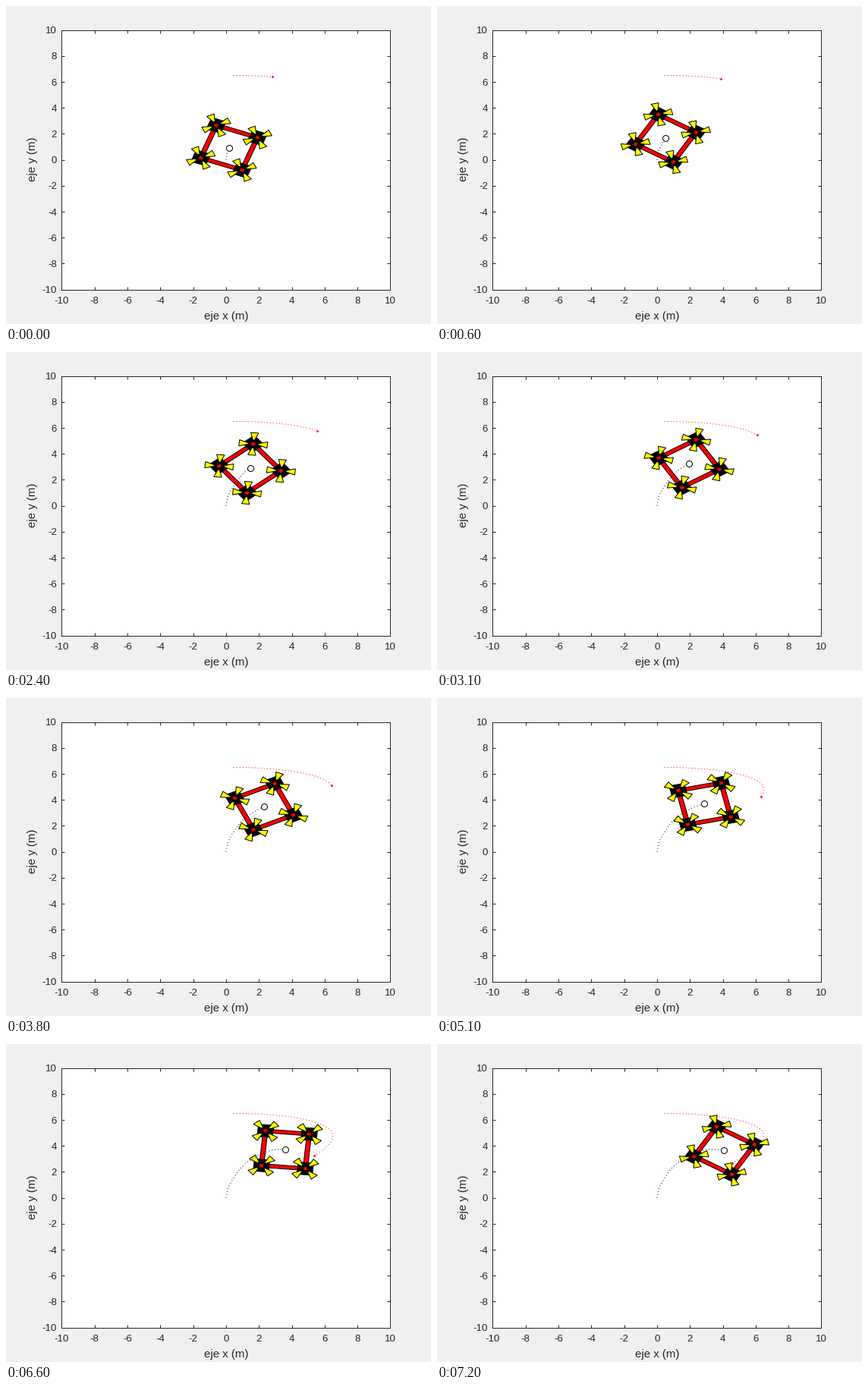
These frames come from a looping animation (560 by 419 pixels, 8 s). A matplotlib script:

```python
import numpy as np
import matplotlib.pyplot as plt
from matplotlib.animation import FuncAnimation
from matplotlib.patches import Polygon

W, H, DPI = 560, 419, 100
PX = 72 / DPI    # points per pixel
STEP = 100       # ms per frame
INK = "#262626"

# The plot refreshes unevenly: frames each pose is held
HOLDS = [6, 10, 8, 7, 7, 7, 6, 8, 7, 6, 8]
POSE = np.repeat(np.arange(len(HOLDS)), HOLDS)

LEAD = 2         # steps simulated before the first pose
SUB = 24         # curve samples per step
SWEEP = np.radians(5.46)   # goal phase per step
RADIUS = 1.892   # centre to motor

# Drone way-points in metres, two steps apart
WAY = [(0, 0), (.19, .93), (.97, 2.38), (1.95, 3.25),
       (2.63, 3.61), (3.18, 3.73), (4.09, 3.64)]


def smooth(points, n):
    """Catmull-Rom curve through the points, n samples per span."""
    p = np.array(points, float)
    p = np.vstack([2 * p[0] - p[1], p, 2 * p[-1] - p[-2]])
    t = np.linspace(0, 1, n, endpoint=False)[:, None]
    spans = []
    for a, b, c, d in zip(p, p[1:], p[2:], p[3:]):
        spans.append(b + t * (c - a) / 2 + t**2 * (a - 2.5 * b + 2 * c - d / 2)
                     + t**3 * (1.5 * (b - c) + (d - a) / 2))
    return np.vstack(spans + [p[-2:-1]])


def turn(pts, angle):
    c, s = np.cos(angle), np.sin(angle)
    return np.asarray(pts, float) @ np.array([[c, s], [-s, c]])


def box(x0, x1, half):
    return np.array([(x0, -half), (x1, -half), (x1, half), (x0, half)])


def square(half):
    return turn(box(-half, half, half), np.pi / 4)


def build():
    """Drone parts around the origin at heading zero, as (shape, colour)."""
    quarter = np.arange(4) * np.pi / 2
    motors = [turn([(RADIUS, 0)], q)[0] for q in quarter]
    arm = box(0, RADIUS * np.sqrt(2), .14)
    blade = np.array([(.30, -.05), (.86, -.24), (.86, .24), (.30, .05)])
    parts = [(turn(arm, q + 3 * np.pi / 4) + m, "red") for m, q in zip(motors, quarter)]
    for m in motors:
        parts += [(square(.47) + m, "black"), (square(.14) + m, "red")]
        parts += [(turn(blade, q) + m, "yellow") for q in quarter]
    return parts


# The goal runs along a figure of eight; the drone faces it half a step late
drone = smooth(WAY, 2 * SUB)
phase = SWEEP * np.arange(len(drone)) / SUB
goal = 6.5 * np.column_stack([np.sin(2 * phase + .07), np.cos(phase)])
bearing = np.arctan2(*(goal - drone).T[::-1])

plt.rcParams.update({"font.family": "Liberation Sans", "axes.unicode_minus": False,
                     "text.color": INK})
fig = plt.figure(figsize=(W / DPI, H / DPI), dpi=DPI, facecolor="#f0f0f0")
ax = fig.add_axes([73.4 / W, 45.4 / H, 433 / W, 342 / H])
ax.set(xlim=(-10, 10), ylim=(-10, 10),
       xticks=range(-10, 11, 2), yticks=range(-10, 11, 2))
ax.tick_params(direction="in", top=True, right=True, length=4 * PX, width=PX,
               color=INK, labelcolor=INK, labelsize=13.2 * PX)
ax.tick_params(axis="x", pad=9.5 * PX)
ax.tick_params(axis="y", pad=6.5 * PX)
for spine in ax.spines.values():
    spine.set(linewidth=PX, edgecolor=INK)
label = dict(fontsize=15 * PX, ha="center", va="center")
fig.text(290 / W, 1 - 408.5 / H, "eje x (m)", **label)
fig.text(35.5 / W, 1 - 202 / H, "eje y (m)", rotation=90, **label)

shapes = build()
patches = [ax.add_patch(Polygon(xy, facecolor=col, edgecolor="black",
                                linewidth=PX, zorder=2)) for xy, col in shapes]
dotted = dict(lw=PX, ls=(0, (1, 3)), dash_capstyle="butt", zorder=3)
drone_trail, = ax.plot([], [], color="black", **dotted)
goal_trail, = ax.plot([], [], color="red", **dotted)
drone_mark, = ax.plot([], [], "o", ms=8 * PX, mfc="white", mec="black", mew=PX, zorder=4)
goal_mark, = ax.plot([], [], "o", ms=2.8 * PX, mfc="red", mec="none", zorder=4)


def draw(frame):
    end = (POSE[frame] + LEAD) * SUB
    heading = bearing[end - SUB // 2] - np.pi / 4
    for patch, (xy, _) in zip(patches, shapes):
        patch.set_xy(turn(xy, heading) + drone[end])
    for path, trail, mark in ((drone, drone_trail, drone_mark),
                              (goal, goal_trail, goal_mark)):
        trail.set_data(*path[:end + 1].T)
        mark.set_data(*path[end:end + 1].T)
    return [*patches, drone_trail, goal_trail, drone_mark, goal_mark]


anim = FuncAnimation(fig, draw, frames=len(POSE), interval=STEP,
                     repeat=True, repeat_delay=0, blit=False)
plt.show()
```
